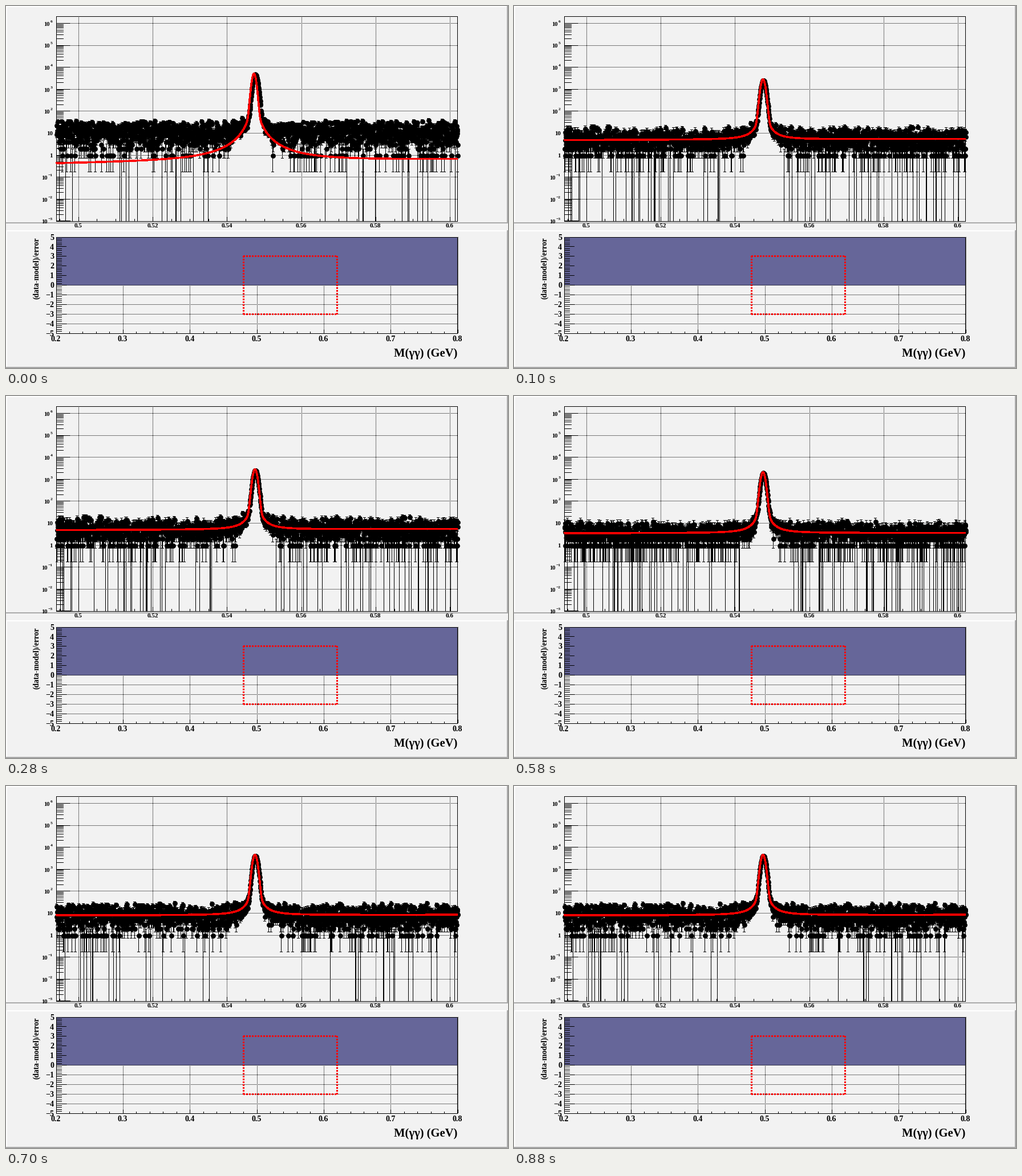
Recreate the animation shown at these times as a matplotlib script. Size 880 by 636 pixels, loop 1000 ms.

```python
import numpy as np
import matplotlib.pyplot as plt
from matplotlib.animation import FuncAnimation
from matplotlib.collections import LineCollection
from matplotlib.patches import Rectangle

W, H, DPI = 880, 636, 100
PX = 72 / DPI
BG, BLUE, SHADE = "#f2f2f2", "#666699", "#a9a9a9"
LEFT, RIGHT = 88, 792
TOP, BOTTOM = 18, 378
LOW_TOP, LOW_BOTTOM = 406, 575
BINS = 1600

plt.rcParams["font.family"] = "Liberation Serif"
plt.rcParams["font.weight"] = "bold"
plt.rcParams["path.snap"] = False  # coordinates are already pixel centres
fig = plt.figure(figsize=(W / DPI, H / DPI), dpi=DPI, facecolor=BG)
ax = fig.add_axes([0, 0, 1, 1])
ax.set(xlim=(0, W), ylim=(H, 0))
ax.axis("off")


def mass_x(m):
    return 127.3 + (m - 0.5) * 6515


def log_y(v):
    return 262 - 38.6 * np.log10(v)


def low_x(m):
    return LEFT + (m - 0.2) * (RIGHT - LEFT) / 0.6


def low_y(v):
    return 490.5 - 16.9 * v


def snap(v):
    return np.floor(v) + 0.5


def line(x0, y0, x1, y1, width=1, color="k", style="-", z=2):
    ax.plot([x0, x1], [y0, y1], color=color, lw=width * PX, ls=style,
            antialiased=False, solid_capstyle="butt", dash_capstyle="butt",
            zorder=z)


def hline(y, x0, x1, **kw):
    line(x0, snap(y), x1, snap(y), **kw)


def vline(x, y0, y1, **kw):
    line(snap(x), y0, snap(x), y1, **kw)


def label(x, y, s, size, ha="right"):
    ax.text(x, y + 0.33 * size, s, fontsize=size * PX, ha=ha,
            va="baseline", zorder=8)


def frame(top, bottom):
    for y in (top, bottom):
        hline(y, LEFT, RIGHT, z=5)
    for x in (LEFT, RIGHT - 1):
        vline(x, top, bottom + 1, z=5)


DOTS = (0, (1, 2))


def draw_pads():
    for top, bottom in ((0, 381), (394, 635)):
        line(0, top + 1, W, top + 1, width=2, color="w", z=1)
        line(1, top, 1, bottom, width=2, color="w", z=1)
        line(0, bottom, W, bottom, width=2, color=SHADE, z=1)
        line(W - 1, top, W - 1, bottom, width=2, color=SHADE, z=1)


def draw_upper():
    frame(TOP, BOTTOM)
    for p in range(-3, 7):
        y = log_y(10.0 ** p)
        if p > -3:
            hline(y, LEFT, RIGHT, style=DOTS)
        hline(y, LEFT, LEFT + 25)
        for k in range(2, 10):
            minor = log_y(k * 10.0 ** p)
            if minor > TOP:
                hline(minor, LEFT, LEFT + 13)
        if p in (0, 1):
            label(82, y, str(10 ** p), 11)
        else:
            label(77 if p > 0 else 73, y + 1, "10", 10.5)
            label(81.5, y - 4, str(p).replace("-", "\u2212"), 7.5)
    for i in range(-1, 21):
        m = 0.5 + 0.005 * i
        x = mass_x(m)
        major = i % 4 == 0
        vline(x, BOTTOM - (8 if major else 4), BOTTOM)
        if major:
            vline(x, TOP, BOTTOM, style=DOTS)
            label(x - 0.7, 385, f"{m:g}", 11.3, "center")


def draw_lower():
    ax.add_patch(Rectangle((LEFT, LOW_TOP), RIGHT - LEFT, 85, fc=BLUE,
                           ec="none", zorder=3))
    frame(LOW_TOP, LOW_BOTTOM)
    for i in range(-25, 26):
        hline(low_y(i / 5), LEFT, LEFT + (18 if i % 5 == 0 else 10), z=4)
    for v in range(-5, 6):
        y = low_y(v)
        hline(y, LEFT, RIGHT, style=DOTS, z=4 if v == 0 else 2)
        label(84, y, str(v).replace("-", "\u2212"), 14)
    for i in range(31):
        m = 0.2 + 0.02 * i
        vline(low_x(m), LOW_BOTTOM - (6 if i % 5 == 0 else 3), LOW_BOTTOM)
        if i % 5 == 0:
            vline(low_x(m), LOW_TOP, LOW_BOTTOM, style=DOTS)
            label(low_x(m) - 0.7, 584, f"{m:.1f}", 14, "center")
    x0, x1 = snap(low_x(0.48)), snap(low_x(0.62))
    y0, y1 = snap(low_y(3)), snap(low_y(-3))
    for a, b, c, d in ((x0, y0, x1, y0), (x0, y1, x1, y1),
                       (x0, y0, x0, y1), (x1, y0, x1, y1)):
        line(a, b, c, d, width=2.6, color="r", style=(0, (1, 1)), z=6)
    label(791.5, 609, "M(\u03b3\u03b3) (GeV)", 20.6)
    ax.text(54, 460.5, "(data-model)/error", fontsize=13.5 * PX, rotation=90,
            ha="center", va="center", zorder=8)


def signal(x, peak, center, sigma):
    """Gaussian core on Lorentzian tails."""
    d2 = (x - center) ** 2
    core = peak * (1 - 1 / 12) * np.exp(-d2 / (2 * sigma ** 2))
    return core + peak / (d2 + 12)


def draw_fit(seed, peak, center, sigma, base, mean, spread):
    rng = np.random.default_rng(seed)
    x = LEFT + (np.arange(BINS) + 0.5) * (RIGHT - LEFT) / BINS
    noise = rng.poisson(rng.gamma(spread, mean / spread, BINS))
    noise = np.where(noise > 3.6 * mean, noise // 2, noise)
    n = noise + rng.poisson(signal(x, 0.93 * peak, 436.7, 3.4))

    # Approximate 68% Poisson intervals
    k = np.maximum(n, 1)
    low = np.where(n > 0, k * (1 - 1 / (9 * k) - 1 / (3 * np.sqrt(k))) ** 3,
                   1e-3)
    u = n + 1
    high = u * (1 - 1 / (9 * u) + 1 / (3 * np.sqrt(u))) ** 3
    sx, ylow, yhigh = snap(x), snap(log_y(low)), snap(log_y(high))
    bars = [[(a, b), (a, c)] for a, b, c in zip(sx, ylow, yhigh)]
    bars += [[(a - 2.5, c), (a + 2.5, c)] for a, c in zip(sx, yhigh)]
    bars += [[(a - 2.5, b), (a + 2.5, b)]
             for a, b, c in zip(sx, ylow, n) if c > 0]
    lines = LineCollection(bars, colors="k", linewidths=PX,
                           antialiaseds=False, zorder=5)
    ax.add_collection(lines, autolim=False)

    hit = n > 0
    dots = ax.scatter(sx[hit], snap(log_y(n[hit])), s=(8.8 * PX) ** 2, c="k",
                      linewidths=0, antialiased=False, zorder=6)

    cx = np.linspace(LEFT, RIGHT, 1409)
    model = signal(cx, peak, center, sigma)
    model += np.interp(cx, (LEFT, RIGHT), base)
    curve, = ax.plot(cx, log_y(model), color="r", lw=2.6 * PX,
                     antialiased=False, solid_capstyle="butt", zorder=7)
    return lines, dots, curve


draw_pads()
draw_upper()
draw_lower()
fits = [
    draw_fit(11, 5070, 434.7, 3.1, (0.39, 0.64), 11, 1.7),
    draw_fit(22, 2790, 436.5, 3.4, (4.8, 5.5), 5.3, 3),
    draw_fit(33, 2070, 436.5, 3.4, (3.5, 3.6), 3.6, 4),
    draw_fit(44, 4500, 436.5, 3.4, (7.9, 8.4), 8.2, 2.4),
]


def update(i):
    current = (i + 2) // 3
    for j, artists in enumerate(fits):
        for a in artists:
            a.set_visible(j == current)
    return [a for artists in fits for a in artists]


anim = FuncAnimation(fig, update, frames=10, interval=100, repeat=True,
                     repeat_delay=0, blit=False)
plt.show()
```
